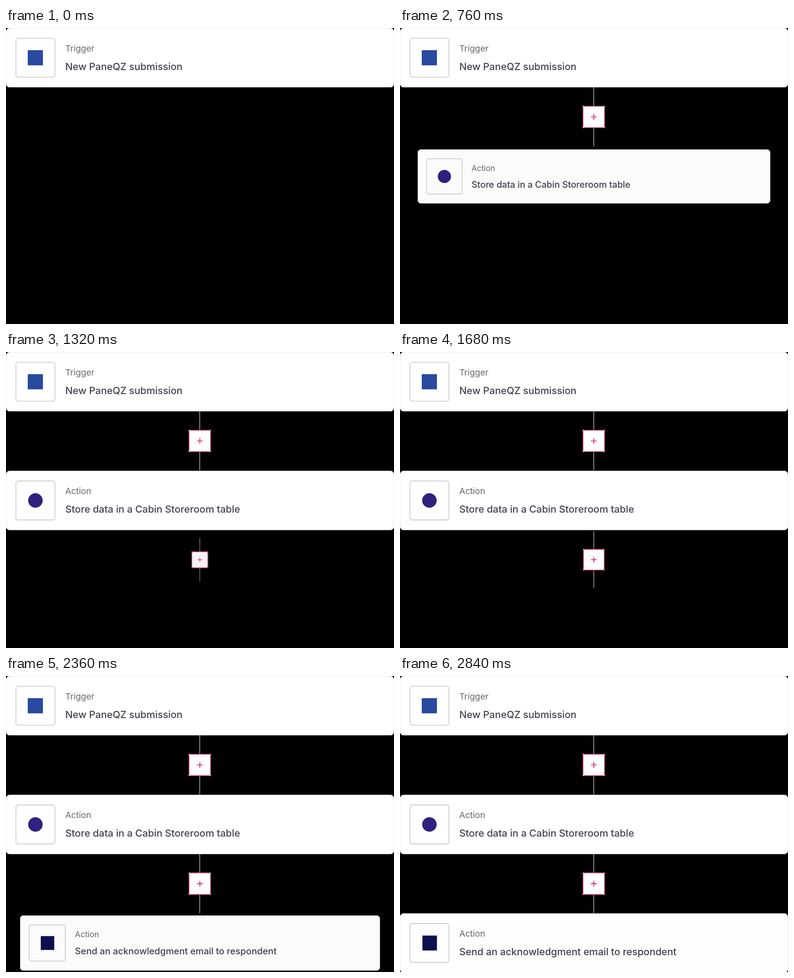
Animation, 856 px wide and 654 px high, one loop 3.88 s. Source, as an HTML page:

```html
<!DOCTYPE html>
<html lang="en">
<head>
<meta charset="utf-8">
<title>Workflow steps</title>
<style>
  html, body { margin: 0; width: 100%; height: 100%; overflow: hidden; background: #000; }
  svg { display: block; width: 856px; height: 654px; }
  text { font-family: Inter, sans-serif; }
  .card { fill: #fff; stroke: #ebebeb; }
  .tile { fill: #fff; stroke: #bfbfbf; stroke-width: 1.36; }
  .kind { font-size: 19.1px; letter-spacing: -.004em; fill: #6a6a6e; }
  .name { font-size: 21.83px; font-weight: 500; letter-spacing: -.0035em; fill: #42444e; }
  .line { stroke: #fff; }
  .add { fill: none; stroke: #cf1a68; stroke-width: 1.36; }
  .plus { fill: none; stroke: #cf1a68; stroke-width: 1.7; }

  .pop {
    transform-box: view-box;
    animation: 3880ms linear infinite;
  }
  .link1 { transform-origin: 427.5px 196.5px; animation-name: link1; }
  .card1 { transform-origin: 427.8px 327.8px; animation-name: card1; }
  .link2 { transform-origin: 427.5px 459px; animation-name: link2; }
  .card2 { transform-origin: 427.8px 589.6px; animation-name: card2; }

  /* hidden, then a cut to 70% size that eases out to full size */
  @keyframes link1 {
    0%, 1.545% { opacity: 0; transform: scale(.7); }
    1.546% { opacity: .95; transform: scale(.7); animation-timing-function: cubic-bezier(.333, 1, .667, .99); }
    12.99%, 100% { opacity: 1; transform: none; }
  }
  @keyframes card1 {
    0%, 12.989% { opacity: 0; transform: scale(.7); }
    12.99% { opacity: .95; transform: scale(.7); animation-timing-function: cubic-bezier(.333, 1, .667, .99); }
    33.093%, 100% { opacity: 1; transform: none; }
  }
  @keyframes link2 {
    0%, 33.092% { opacity: 0; transform: scale(.7); }
    33.093% { opacity: .95; transform: scale(.7); animation-timing-function: cubic-bezier(.333, 1, .667, .99); }
    53.196%, 100% { opacity: 1; transform: none; }
  }
  @keyframes card2 {
    0%, 53.195% { opacity: 0; transform: scale(.7); }
    53.196% { opacity: .95; transform: scale(.7); animation-timing-function: cubic-bezier(.333, 1, .667, .99); }
    73.299%, 100% { opacity: 1; transform: none; }
  }
</style>
</head>
<body>
<svg viewBox="0 0 856 654">
  <defs>
    <g id="panel">
      <rect class="card" x=".5" y=".5" width="855" height="130.2" rx="7"/>
      <rect class="tile" x="21.9" y="22.6" width="86" height="86" rx="4.5"/>
    </g>
    <g id="link">
      <path class="line" d="M427.5 131V172M427.5 221V261.5"/>
      <rect x="403" y="172" width="49" height="49" fill="#fff"/>
      <rect class="add" x="403.8" y="172.7" width="47.6" height="47.6" rx="4"/>
      <path class="plus" d="M421.2 196.5H434.2M427.7 190V203"/>
    </g>
  </defs>

  <g class="pop link1"><use href="#link"/></g>
  <g class="pop link2"><use href="#link" y="262.4"/></g>

  <g>
    <use href="#panel"/>
    <rect x="48" y="49" width="33.5" height="33.5" fill="#284a9f"/>
    <text class="kind" x="130.7" y="52">Trigger</text>
    <text class="name" x="130.7" y="93">New PaneQZ submission</text>
  </g>

  <g class="pop card1">
    <use href="#panel" y="262.4"/>
    <circle cx="64.9" cy="328" r="16" fill="#2f2180"/>
    <text class="kind" x="130.7" y="314.3">Action</text>
    <text class="name" x="130.7" y="355.4">Store data in a Cabin Storeroom table</text>
  </g>

  <g class="pop card2">
    <use href="#panel" y="524.4"/>
    <rect x="49.5" y="573.5" width="32" height="33" fill="#0d1150"/>
    <text class="kind" x="130.7" y="576.5">Action</text>
    <text class="name" x="130.7" y="617.5">Send an acknowledgment email to respondent</text>
  </g>
</svg>
</body>
</html>
```
